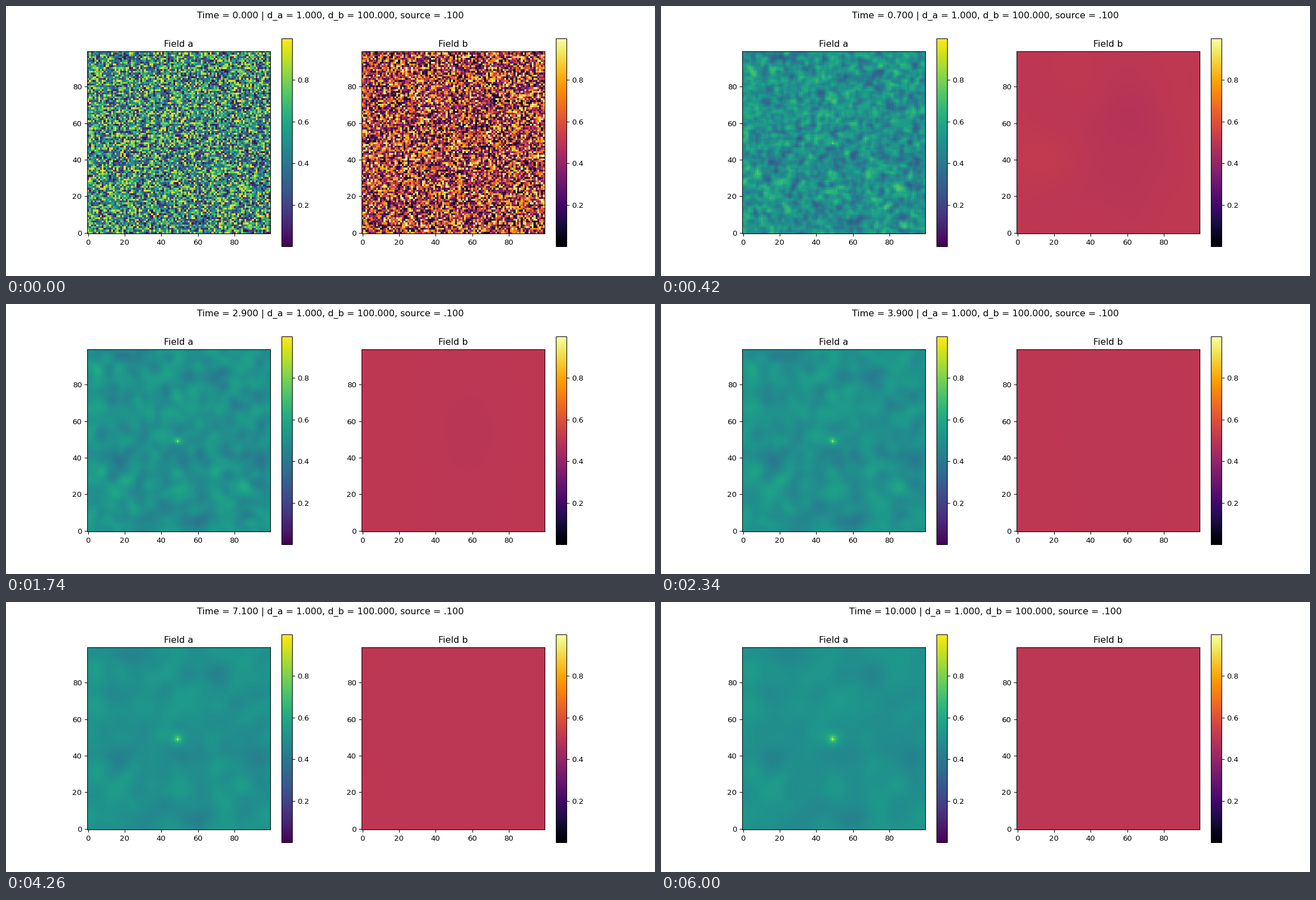
A matplotlib script that plays this animation: 1159 by 483 pixels, repeating every 6.06 s.

```python
import numpy as np
import matplotlib.pyplot as plt
from matplotlib.animation import FuncAnimation

N, FRAMES, DT = 100, 101, 0.1
D_A, D_B, SOURCE = 1.0, 100.0, 0.1

rng = np.random.default_rng(7)
wave = 2 - 2 * np.cos(2 * np.pi * np.fft.fftfreq(N))
EIGEN = wave[:, None] + wave[None, :]  # periodic lattice Laplacian


def diffuse(d, source=0.0):
    """Uniform noise that spreads at rate d, fed by a point near the middle."""
    field = rng.random((N, N))
    push = np.zeros((N, N))
    push[N // 2 - 1, N // 2 - 1] = source
    push = np.fft.fft2(push)
    decay = np.exp(-d * DT * EIGEN)
    spectrum = np.fft.fft2(field)
    states = [field]
    for _ in range(FRAMES - 1):
        spectrum = (spectrum + push) * decay
        states.append(np.fft.ifft2(spectrum).real)
    return states


fields = diffuse(D_A, SOURCE), diffuse(D_B)

# 12 x 5 inches at this dpi is a 1159 x 483 pixel canvas
fig, axes = plt.subplots(1, 2, figsize=(12, 5), dpi=96.601)
images = []
for ax, states, name, cmap in zip(axes, fields, "ab", ("viridis", "inferno")):
    im = ax.imshow(states[0], cmap=cmap, origin="lower")
    ax.set_title(f"Field {name}")
    fig.colorbar(im, ax=ax)
    images.append(im)
title = fig.suptitle("")


def draw(i):
    for im, states in zip(images, fields):
        im.set_data(states[i])
    title.set_text(f"Time = {i * DT:.3f} | d_a = {D_A:.3f}, "
                   f"d_b = {D_B:.3f}, source = .100")
    return [*images, title]


anim = FuncAnimation(fig, draw, frames=FRAMES, init_func=lambda: draw(0),
                     interval=60, repeat=True, repeat_delay=0, blit=False)
plt.show()
```
